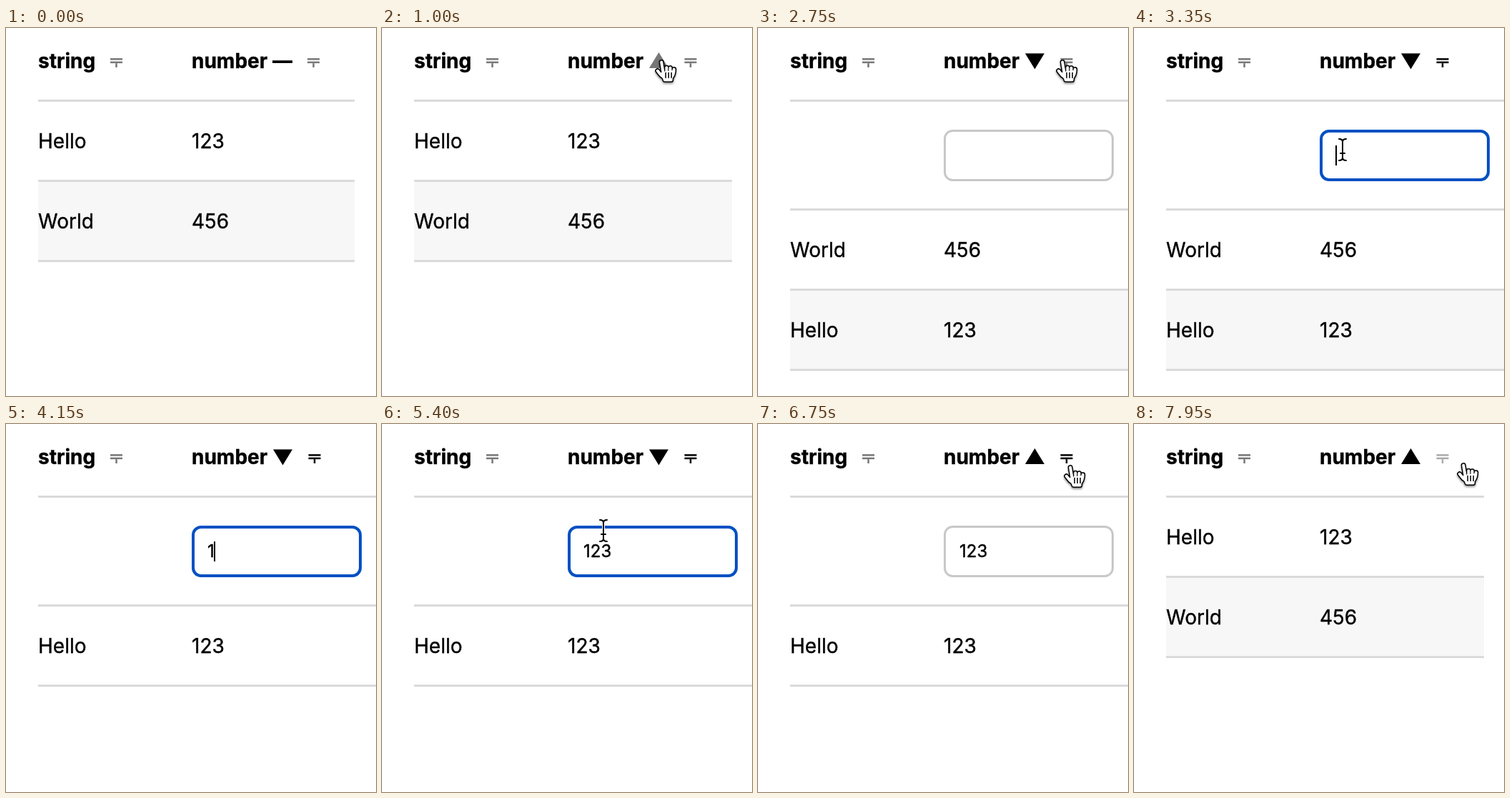
These frames come from a looping animation (518x514 px, 8 s). An HTML page with a canvas:

```html
<!DOCTYPE html>
<html lang="en">
<head>
<meta charset="utf-8">
<title>Sortable, filterable table</title>
<style>
html, body { margin: 0; width: 100%; height: 100%; overflow: hidden; background: #fff; }
canvas { display: block; width: 518px; height: 514px; }
</style>
</head>
<body>
<canvas id="stage" width="518" height="514"></canvas>
<script>
const ctx = document.getElementById('stage').getContext('2d');
const LOOP = 8000, STEP = 50;
const BLACK = '#000', WHITE = '#fff', GRAY = '#777', LIGHT = '#aaa', LINE = '#dadada';
const LEFT = 45, ROW = 112;

// Cursor hotspots
const entry = { x: 469, y: 189 }, sortButton = { x: 392, y: 46 }, filterButton = { x: 427, y: 46 };
const input = { x: 292, y: 170 }, sortEdge = { x: 387, y: 59 }, filterEdge = { x: 438, y: 59 };
const filterLow = { x: 429, y: 56 }, exit = { x: 462, y: 56 };

const moves = [
  { start: 300, end: 600, from: entry, to: sortButton, lift: 40 },
  { start: 2150, end: 2500, from: sortButton, to: filterButton, lift: 16 },
  { start: 2850, end: 3150, from: filterButton, to: input, lift: 0 },
  { start: 5150, end: 6050, from: input, to: sortEdge, lift: 0 },
  { start: 6550, end: 6750, from: sortEdge, to: filterEdge, lift: 0 },
  { start: 6750, end: 7000, from: filterEdge, to: filterLow, lift: 0 },
  { start: 7900, end: 7950, from: filterLow, to: exit, lift: 0 }
];

const clamp01 = v => Math.min(1, Math.max(0, v));
const smooth = k => k * k * (3 - 2 * k);

function cursorAt(t) {
  if (t < 300 || (t >= 4000 && t < 5250)) return null;
  const { start, end, from, to, lift } = moves.filter(m => m.start <= t).pop();
  const k = smooth(clamp01((t - start) / (end - start)));
  return {
    x: from.x + (to.x - from.x) * k,
    y: from.y + (to.y - from.y) * k - lift * 4 * k * (1 - k)
  };
}

function rect(x, y, w, h, color) {
  ctx.fillStyle = color;
  ctx.fillRect(x, y, w, h);
}

// The thin stroke gives the slightly heavier look of smoothed type.
function text(str, x, y, font = '28px') {
  ctx.font = `${font} Inter, sans-serif`;
  ctx.fillStyle = ctx.strokeStyle = BLACK;
  ctx.lineWidth = 0.4;
  ctx.fillText(str, x, y);
  ctx.strokeText(str, x, y);
}

function rule(y, right) {
  rect(LEFT, y, right - LEFT, 3, LINE);
}

function filterIcon(cx, color) {
  for (const y of [42.2, 46.7]) rect(cx - 8.5, y, 17, 2.5, color);
  rect(cx - 1.25, 49.2, 2.5, 5.8, color);
}

function sortMark(order, color) {
  if (order === 'none') return rect(373, 45.3, 28, 3.7, color);
  const [base, apex] = order === 'up' ? [56, 34] : [35.5, 57.5];
  ctx.fillStyle = color;
  ctx.beginPath();
  ctx.moveTo(374, base);
  ctx.lineTo(401, base);
  ctx.lineTo(387.5, apex);
  ctx.fill();
}

function filterInput(value, focused, caret) {
  const w = focused ? 4 : 3;
  ctx.beginPath();
  ctx.roundRect(260 + w / 2, 142 + w / 2, 238 - w, 72 - w, 11);
  ctx.lineWidth = w;
  ctx.strokeStyle = focused ? '#0050c3' : '#c8c8c8';
  ctx.stroke();
  text(value, 282, 186, '24px');
  if (caret) rect(Math.floor(282 + ctx.measureText(value).width), 164, 2, 28, BLACK);
}

// Thumb, index finger, palm and three knuckles as one path of thick strokes
const hand = new Path2D('M9.9 15.9 12.4 19M12.6 9.8 13.8 17' +
  'M13.5 17.5 21.3 16.5 20.8 18.5 19.4 21V22.2H14.9L14.5 20.8 12.2 18.5Z');
const creases = new Path2D();
for (let i = 0; i < 3; i++) {
  hand.moveTo(16.2 + 2.6 * i, 13.6 + 0.33 * i * i);
  hand.lineTo(16.2 + 2.5 * i, 17);
  creases.moveTo(15.6 + 2 * i, 17.3);
  creases.lineTo(15.6 + 2 * i, 20.7);
}
const arrow = new Path2D('M0 0V14.5L3.4 11.3 6 17 8.4 16 5.8 10.3H10.5Z');
const beam = new Path2D('M-5-15Q0-15 0-11V11Q0 15-5 15M5-15Q0-15 0-11V11Q0 15 5 15M-3 5H3');

function stroke(path, color, width) {
  ctx.strokeStyle = color;
  ctx.lineWidth = width;
  ctx.stroke(path);
}

function withShadow(draw) {
  ctx.shadowColor = 'rgba(0,0,0,.45)';
  ctx.shadowBlur = 3;
  ctx.shadowOffsetY = 2;
  draw();
  ctx.shadowColor = 'transparent';
}

function drawHand() {
  ctx.translate(-26, -18);
  ctx.scale(2, 2);
  withShadow(() => stroke(hand, BLACK, 3.5));
  stroke(hand, WHITE, 2);
  ctx.fillStyle = WHITE;
  ctx.fill(hand);
  stroke(creases, BLACK, 0.75);
}

function drawBeam() {
  stroke(beam, WHITE, 4);
  stroke(beam, BLACK, 2);
}

function drawArrow() {
  ctx.scale(2, 2);
  withShadow(() => stroke(arrow, WHITE, 2));
  ctx.fillStyle = BLACK;
  ctx.fill(arrow);
}

function drawCursor({ x, y }, filtering) {
  const overButtons = x > 365 && x < 475 && y < 72;
  const overInput = filtering && x > 260 && x < 498 && y > 142 && y < 214;
  ctx.save();
  ctx.lineJoin = ctx.lineCap = 'round';
  ctx.translate(Math.round(x), Math.round(y));
  if (overButtons) drawHand();
  else if (overInput) drawBeam();
  else drawArrow();
  ctx.restore();
}

function iconColor(filtering, cursor) {
  const over = cursor && cursor.x > 415 && cursor.y < 58;
  if (filtering) return over ? GRAY : BLACK;
  return over ? LIGHT : GRAY;
}

const keyTimes = [4000, 4250, 4550];
const inputValue = t => '123'.slice(0, keyTimes.filter(at => t >= at).length);

function caretVisible(t) {
  if (t < 3350 || t >= 6100) return false;
  const lastAction = [3350, ...keyTimes].filter(at => t >= at).pop();
  return (t - lastAction) % 1000 < 500;
}

function render(t) {
  const filtering = t >= 2750 && t < 7100;
  const sort = t < 1000 ? 'none' : t >= 1800 && t < 6200 ? 'down' : 'up';
  const cursor = cursorAt(t);
  const overSort = cursor && Math.abs(cursor.x - 387.5) < 19 && cursor.y < 63;
  const right = filtering ? 518 : t < 1000 ? 488 : 490;

  rect(0, 0, 518, 514, WHITE);
  text('string', LEFT, 56, 'bold 28px');
  text('number', 260, 56, 'bold 28px');
  filterIcon(154.5, GRAY);
  filterIcon(t < 1000 ? 430.5 : 432, iconColor(filtering, cursor));
  sortMark(sort, overSort ? GRAY : BLACK);
  rule(100, right);

  if (filtering) {
    filterInput(inputValue(t), t >= 3350 && t < 6100, caretVisible(t));
    rule(252, right);
  }

  let rows = [['Hello', '123'], ['World', '456']];
  if (sort === 'down') rows.reverse();
  if (filtering) rows = rows.filter(row => row[1].startsWith(inputValue(t)));
  rows.forEach(([word, number], i) => {
    const y = (filtering ? 255 : 103) + i * ROW;
    if (i % 2) rect(LEFT, y, right - LEFT, ROW - 3, '#f7f7f7');
    rule(y + ROW - 3, right);
    text(word, LEFT, y + 65);
    text(number, 260, y + 65);
  });

  if (cursor) drawCursor(cursor, filtering);
}

const start = performance.now();
function tick() {
  const t = (performance.now() - start) % LOOP;
  render(Math.floor(t / STEP) * STEP);
  requestAnimationFrame(tick);
}
tick();
</script>
</body>
</html>
```
